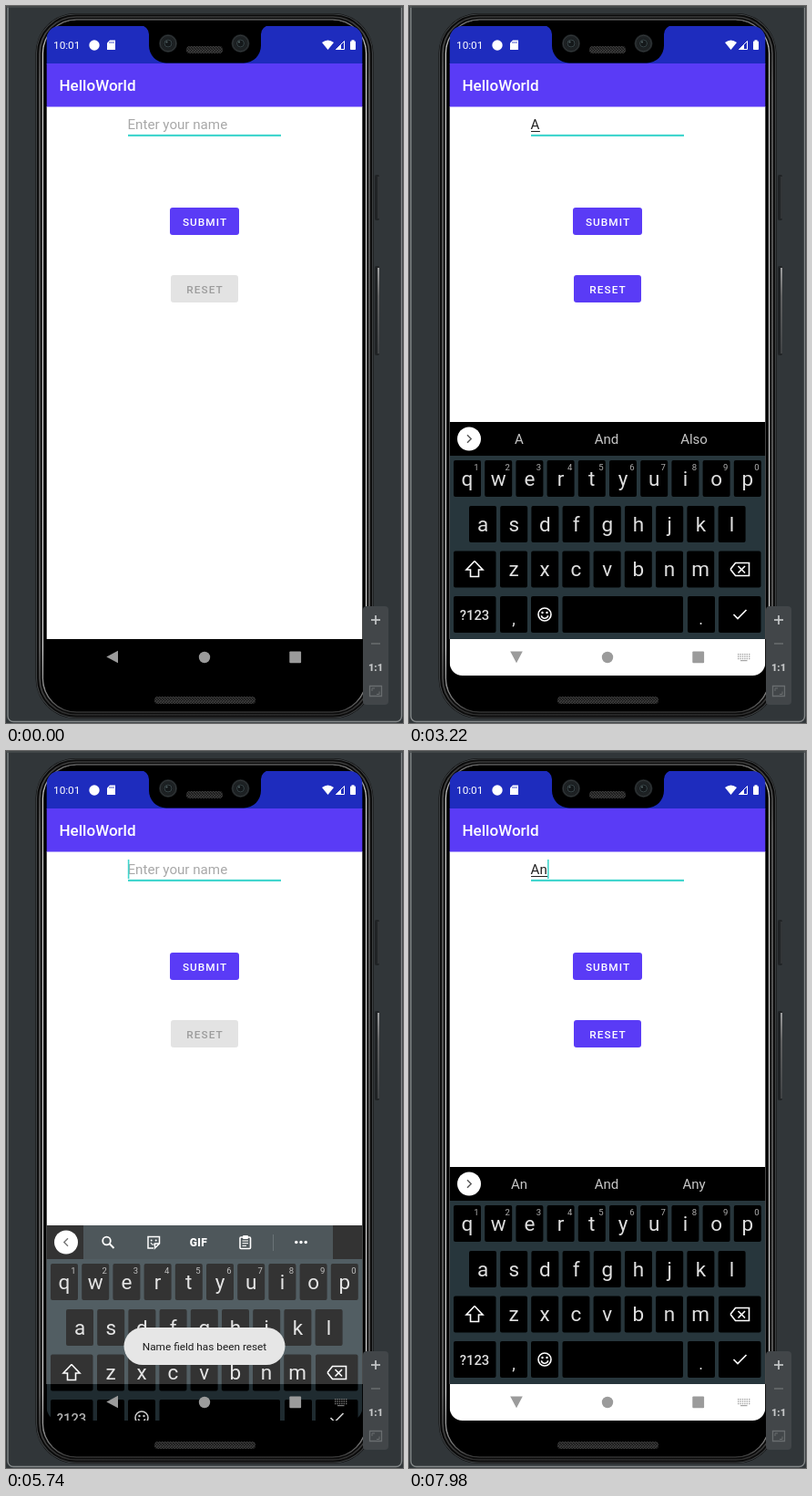
An HTML page with a canvas for the animation above (8000 ms loop, 436 by 786 pixels).

```html
<!DOCTYPE html>
<html lang="en">
<head>
<meta charset="utf-8">
<title>HelloWorld</title>
<style>
  html, body { margin: 0; width: 436px; height: 786px; overflow: hidden; background: #313639; }
  canvas { display: block; }
</style>
</head>
<body>
<canvas id="stage" width="436" height="786"></canvas>
<script>
const stage = document.getElementById('stage').getContext('2d');
const layer = document.createElement('canvas');
layer.width = 436;
layer.height = 786;
const layerCtx = layer.getContext('2d');
let c = stage;

const LOOP = 8000;
const PURPLE = '#5a3bf6', STATUS = '#1e2cbe', TEAL = '#42d6ce', KEY_TEXT = '#dedede';
const LEFT = 44.7, WIDTH = 346.6;
const PITCH = 34.2;
const ROWS = [
  { keys: 'qwertyuiop', x: 64, y: 498 },
  { keys: 'asdfghjkl', x: 81, y: 548 },
  { keys: 'zxcvbnm', x: 115, y: 597.5 }
];
const SHOWS = [626, 5602];
const HIDE = 4410;

const clamp = v => Math.max(0, Math.min(1, v));
const ramp = (t, from, to) => clamp((t - from) / (to - from));
const within = (t, from, to) => t >= from && t < to;

// cubic-bezier(.4, 0, .2, 1)
function ease(x) {
  let lo = 0, hi = 1;
  for (let i = 0; i < 20; i++) {
    const s = (lo + hi) / 2, r = 1 - s;
    if (1.2 * r * r * s + 0.6 * r * s * s + s * s * s < x) lo = s; else hi = s;
  }
  return lo * lo * (3 - 2 * lo);
}

// ---- drawing helpers ----
function box(x, y, w, h, r, fill) {
  c.beginPath();
  c.roundRect(x, y, w, h, r);
  c.fillStyle = fill;
  c.fill();
}
function frame(x, y, w, h, r, color, width = 1) {
  c.beginPath();
  c.roundRect(x, y, w, h, r);
  c.strokeStyle = color;
  c.lineWidth = width;
  c.stroke();
}
function disc(x, y, r, fill) {
  c.beginPath();
  c.arc(x, y, r, 0, Math.PI * 2);
  c.fillStyle = fill;
  c.fill();
}
function ring(x, y, r, color, width) {
  c.beginPath();
  c.arc(x, y, r, 0, Math.PI * 2);
  c.strokeStyle = color;
  c.lineWidth = width;
  c.stroke();
}
function line(points, color, width) {
  c.beginPath();
  points.forEach(([x, y]) => c.lineTo(x, y));
  c.strokeStyle = color;
  c.lineWidth = width;
  c.stroke();
}
function shape(points, fill) {
  c.beginPath();
  points.forEach(([x, y]) => c.lineTo(x, y));
  c.closePath();
  c.fillStyle = fill;
  c.fill();
}
function text(str, x, y, size, color, { align = 'left', weight = 400, spacing = 0 } = {}) {
  c.font = `${weight} ${size}px Roboto, sans-serif`;
  c.textAlign = align;
  c.letterSpacing = spacing + 'px';
  c.fillStyle = color;
  c.fillText(str, x, y);
  c.letterSpacing = '0px';
}
function fade(...stops) {
  const g = c.createLinearGradient(0, 10, 0, 780);
  stops.forEach(([at, color]) => g.addColorStop(at, color));
  return g;
}

// ---- device ----
function mesh(x, y, w, h) {
  box(x, y, w, h, h / 2, '#2c2c2c');
  c.save();
  c.clip();
  for (let i = 0; i < w + h; i += 3) {
    line([[x + i, y], [x + i - h, y + h]], '#444', 0.8);
    line([[x + i - h, y], [x + i, y + h]], '#111', 0.8);
  }
  c.restore();
}

function drawDevice() {
  c.fillStyle = '#313639';
  c.fillRect(0, 0, 436, 786);
  frame(2, -6, 432.5, 790.5, 6, '#85898a', 1.4);
  line([[0, 1], [436, 1]], '#484c4e', 1.5);

  box(405, 185, 5, 50, 2, '#202325');
  box(405, 285, 5, 98, 2, '#202325');
  line([[409, 187], [409, 233]], '#44484a', 1);
  line([[409, 287], [409, 381]], fade([0.36, '#c8c8c8'], [0.4, '#777'], [0.48, '#4b4e50']), 1.5);

  box(32.5, 8, 371, 773, 44, '#0b0b0b');
  frame(33.5, 9, 369, 771, 43, '#3c3f41', 1.2);
  frame(37, 12, 362, 765, 40, fade([0, '#3a3a3a'], [0.1, '#6a6a6a'], [0.9, '#6a6a6a'], [1, '#2c2c2c']), 1.5);
  frame(40.5, 15, 355, 759, 37,
    fade([0, '#555'], [0.05, '#c9c9c9'], [0.9, '#d2d2d2'], [0.97, '#777'], [1, '#222']), 1.5);
  box(41.3, 15.8, 353.4, 757.4, 36, '#000');
  mesh(163, 757, 111, 8);
}

function drawNotch() {
  c.beginPath();
  c.moveTo(146, 21);
  c.arcTo(157, 21, 157, 32, 10);
  c.arcTo(157, 62.5, 180, 62.5, 19);
  c.arcTo(280, 62.5, 280, 40, 19);
  c.arcTo(280, 21, 291, 21, 10);
  c.lineTo(291, 21);
  c.closePath();
  c.fillStyle = '#000';
  c.fill();
  for (const x of [178, 257.5]) {
    disc(x, 41, 10, '#1d2123');
    ring(x, 41, 8.7, '#34393b', 1);
    disc(x, 41, 5, '#14181a');
    ring(x, 41, 4, '#384447', 1);
    disc(x - 1.5, 39.5, 1, '#5a6a6c');
  }
  mesh(198, 44, 40, 8);
}

function drawStatusIcons() {
  text('10:01', 52, 47.3, 11.8, '#fff');
  disc(97, 43, 5.7, '#fff');
  shape([[114, 37.5], [120, 37.5], [120, 48], [111, 48], [111, 40.5]], '#fff');
  for (const x of [114, 116, 118]) line([[x, 39], [x, 41]], STATUS, 0.8);

  c.beginPath();
  c.moveTo(353.5, 48);
  c.lineTo(347, 40);
  c.quadraticCurveTo(353.5, 35, 360, 40);
  c.closePath();
  c.fillStyle = '#fff';
  c.fill();
  line([[362.5, 47.5], [371.5, 47.5], [371.5, 38.5], [362.5, 47.5]], '#fff', 1);
  shape([[362, 48], [368, 48], [368, 42]], '#fff');
  box(378, 38.5, 6, 9.5, 0.8, '#fff');
  c.fillRect(379.5, 37.3, 3, 2);
}

function button(label, x, y, w, fill, ink) {
  box(x, y, w, 30, 3, fill);
  text(label, x + w / 2 + 0.5, y + 20, 11.8, ink, { align: 'center', weight: 500, spacing: 1.05 });
}

// ---- state over time ----
function typedText(t) {
  if (within(t, 2310, 4270) || within(t, 7280, 7980)) return 'A';
  return t >= 7980 ? 'An' : '';
}

function caretOn(t) {
  const [start, half] = [[7980, 490], [7280, 490], [5250, 500], [2310, 490], [280, 490]]
    .find(([from]) => t >= from) || [0, 0];
  return half > 0 && Math.floor((t - start) / half) % 2 === 0;
}

function keyboardState(t) {
  const start = t >= SHOWS[1] ? SHOWS[1] : SHOWS[0];
  if (within(t, HIDE, SHOWS[1])) {
    return {
      open: 1 - ease(ramp(t, HIDE, HIDE + 240)),
      turn: 1 - ramp(t, HIDE + 40, HIDE + 190),
      light: t < HIDE + 70
    };
  }
  const spin = 1 - ramp(t, start + 150, start + 280);
  return {
    open: ease(ramp(t, start, start + 280)),
    turn: 1 - spin * spin,
    light: t >= start + 170
  };
}

function pressedKey(t) {
  if (within(t, 2100, 2310) || within(t, 7070, 7280)) return 'a';
  return within(t, 7840, 7980) ? 'n' : '';
}

// ---- app ----
function drawApp(t) {
  c.fillStyle = '#fff';
  c.fillRect(LEFT, 110, WIDTH, 584);
  box(LEFT, 22, WIDTH, 42, [14, 14, 0, 0], STATUS);
  c.fillStyle = PURPLE;
  c.fillRect(LEFT, 63, WIDTH, 47.5);
  drawNotch();
  drawStatusIcons();
  text('HelloWorld', 58.5, 93.3, 17.05, '#fff', { weight: 500 });

  const value = typedText(t);
  text(value || 'Enter your name', 133.5, 135.3, 15.15, value ? '#222' : '#a8a8a8');
  const end = 134 + (value ? c.measureText(value).width : 0);
  if (value) c.fillRect(134, 137, end - 134, 1);
  c.fillStyle = TEAL;
  c.fillRect(134, 140.8, 168, 2.2);
  if (caretOn(t)) c.fillRect(end - 0.2, 119, 1.6, 21);

  button('SUBMIT', 180, 221, 76, PURPLE, '#fff');
  if (value) button('RESET', 181, 295, 74, PURPLE, '#fff');
  else button('RESET', 181, 295, 74, '#e3e3e3', '#9c9c9c');

  const ripple = ramp(t, 3850, 4130);
  if (ripple > 0 && t < HIDE) {
    c.save();
    c.beginPath();
    c.roundRect(181, 295, 74, 30, 3);
    c.clip();
    c.globalAlpha = 0.2 * (1 - ramp(t, 4200, HIDE));
    disc(218, 310, 8 + 34 * ripple, '#fff');
    c.restore();
  }
}

// ---- keyboard ----
function drawToolbar() {
  c.fillStyle = '#222d32';
  c.fillRect(85, 456, 274, 37);
  const ink = '#fff', y = 474.5;
  ring(110.5, y - 1.5, 4.3, ink, 1.8);
  line([[113.5, y + 1.5], [118.5, y + 6.5]], ink, 2);

  line([[162, 481], [156, 481], [156, 468.5], [168.5, 468.5], [168.5, 476], [163.5, 481], [163.5, 476], [168.5, 476]], ink, 1.5);
  disc(159.7, 472.5, 1, ink);
  disc(164.7, 472.5, 1, ink);
  line([[159, 475], [160.5, 477], [163, 477]], ink, 1.2);

  text('GIF', 211.5, 478.7, 12, ink, { align: 'center', weight: 900, spacing: 0.4 });

  frame(257, 469, 11.5, 12.5, 1, ink, 1.6);
  box(260, 467, 6, 4, 1, ink);
  for (const row of [473, 475.7, 478.4]) line([[259.5, row], [row > 478 ? 264 : 266, row]], ink, 1.1);

  line([[293.5, 466], [293.5, 484]], '#465157', 1);
  for (const x of [318.8, 324, 329.2]) disc(x, y, 1.7, ink);
}

function drawKeyboard(t) {
  const words = t >= 7980 ? ['An', 'And', 'Any']
    : within(t, 2310, HIDE) || t >= 7280 ? ['A', 'And', 'Also'] : null;
  const shift = within(t, 1750, 2310) || within(t, 6860, 7280);
  const cased = ch => shift ? ch.toUpperCase() : ch;

  c.fillStyle = '#27363c';
  c.fillRect(LEFT, 456, WIDTH, 238);
  c.fillStyle = '#000';
  c.fillRect(LEFT, 456, WIDTH, 37);
  if (words) words.forEach((w, i) => text(w, 121 + 96 * i, 480, 15, '#c8c8c8', { align: 'center' }));
  else drawToolbar();

  disc(66, 474.5, 13, '#fff');
  const d = words ? 1 : -1;
  line([[66 - 2 * d, 470.3], [66 + 2.2 * d, 474.5], [66 - 2 * d, 478.7]], '#555', 1.4);

  const key = (x, y, w) => box(x, y, w, 40, 2, '#000');
  ROWS.forEach((row, r) => [...row.keys].forEach((ch, i) => {
    const x = row.x + PITCH * i;
    key(x - 15, row.y, 30);
    text(cased(ch), x, row.y + 27.5, 22.5, KEY_TEXT, { align: 'center' });
    if (r === 0) text(String((i + 1) % 10), x + 10, row.y + 10.5, 9.5, '#b0b0b0', { align: 'center' });
  }));

  key(49, 597.5, 46.5);
  const arrow = [[72, 608.5], [81, 618], [76.5, 618], [76.5, 625.5], [67.5, 625.5], [67.5, 618], [63, 618], [72, 608.5]];
  if (shift) shape(arrow, '#fff');
  line(arrow, '#fff', 1.6);

  key(340, 597.5, 46.5);
  line([[353, 617.5], [358.5, 610.5], [373.5, 610.5], [373.5, 624.5], [358.5, 624.5], [353, 617.5]], '#fff', 1.6);
  line([[361.5, 614], [369, 621.5]], '#fff', 1.6);
  line([[369, 614], [361.5, 621.5]], '#fff', 1.6);

  [[49, 46.5], [100, 30], [134, 30], [168.5, 132.5], [306, 30], [340, 46.5]].forEach(([x, w]) => key(x, 647, w));
  text('?123', 72, 672.5, 14.8, KEY_TEXT, { align: 'center', weight: 500 });
  text(',', 115, 678, 18, KEY_TEXT, { align: 'center' });
  text('.', 320.5, 678, 18, KEY_TEXT, { align: 'center' });
  ring(149, 667, 7, '#fff', 1.6);
  disc(146.5, 665, 1.2, '#fff');
  disc(151.5, 665, 1.2, '#fff');
  c.beginPath();
  c.arc(149, 667.5, 3.8, 0.2, Math.PI - 0.2);
  c.stroke();
  line([[356.5, 667], [361, 671.5], [370.5, 662]], '#fff', 1.7);

  const pressed = pressedKey(t);
  if (pressed) {
    const row = ROWS.find(r => r.keys.includes(pressed));
    const x = row.x + PITCH * row.keys.indexOf(pressed);
    box(x - 17.5, row.y - 48, 35, 88, 4, '#37474f');
    text(cased(pressed), x, row.y - 17, 27, '#fff', { align: 'center' });
  }
}

function drawNav(kb) {
  const ink = '#9b9b9b';
  c.save();
  c.translate(117 + kb.turn, 713.5);
  c.rotate(-kb.turn * Math.PI / 2);
  shape([[-6.7, 0], [6, -6.8], [6, 6.8]], ink);
  c.restore();
  disc(218, 714, 6.2, ink);
  box(311.3, 707.5, 12.8, 12.8, 1, ink);
  if (kb.open > 0.5) {
    c.fillStyle = kb.light ? '#a6a6a6' : '#777';
    for (let r = 0; r < 3; r++)
      for (let i = 0; i < 6; i++) c.fillRect(361 + i * 2.4, 710 + r * 2.4, 1.4, 1.4);
    c.fillRect(364, 717, 7.5, 1.2);
  }
}

function drawToast(t) {
  const alpha = ramp(t, 4600, 4920) * (1 - ramp(t, 6265, 6650));
  if (!alpha) return;
  c.save();
  c.globalAlpha = alpha;
  box(129.5, 632, 177, 41, 20.5, '#e6e6e6');
  text('Name field has been reset', 218, 657.3, 11.8, '#1c1c1c', { align: 'center' });
  c.restore();
}

function drawZoomPanel() {
  box(392, 658, 28, 108, 4, '#424649');
  line([[401, 673], [411, 673]], '#c6c8c9', 1.7);
  line([[406, 668], [406, 678]], '#c6c8c9', 1.7);
  line([[401, 699], [411, 699]], '#696d6f', 1.5);
  text('1:1', 406, 729, 11, '#c6c8c9', { align: 'center', weight: 900 });
  frame(399.5, 745.5, 13, 11, 0, '#696d6f', 1.3);
  line([[402, 751], [402, 748], [405, 748]], '#696d6f', 1);
  line([[407, 754.5], [410, 754.5], [410, 751.5]], '#696d6f', 1);
}

function render(t) {
  const kb = keyboardState(t);
  c = stage;
  drawDevice();
  drawApp(t);

  c.save();
  c.beginPath();
  c.roundRect(LEFT, 400, WIDTH, 334, [0, 0, 14, 14]);
  c.clip();
  c.fillStyle = kb.light ? '#fff' : '#000';
  c.fillRect(LEFT, 694, WIDTH, 40);
  if (kb.open > 0) {
    layerCtx.clearRect(0, 0, 436, 786);
    c = layerCtx;
    drawKeyboard(t);
    c = stage;
    c.globalAlpha = Math.min(1, kb.open * 1.04);
    c.drawImage(layer, 0, Math.round(278 * (1 - kb.open)));
    c.globalAlpha = 1;
  }
  drawNav(kb);
  c.restore();

  drawToast(t);
  drawZoomPanel();
}

const begin = performance.now();
function tick() {
  render((performance.now() - begin) % LOOP);
  requestAnimationFrame(tick);
}
tick();
</script>
</body>
</html>
```
